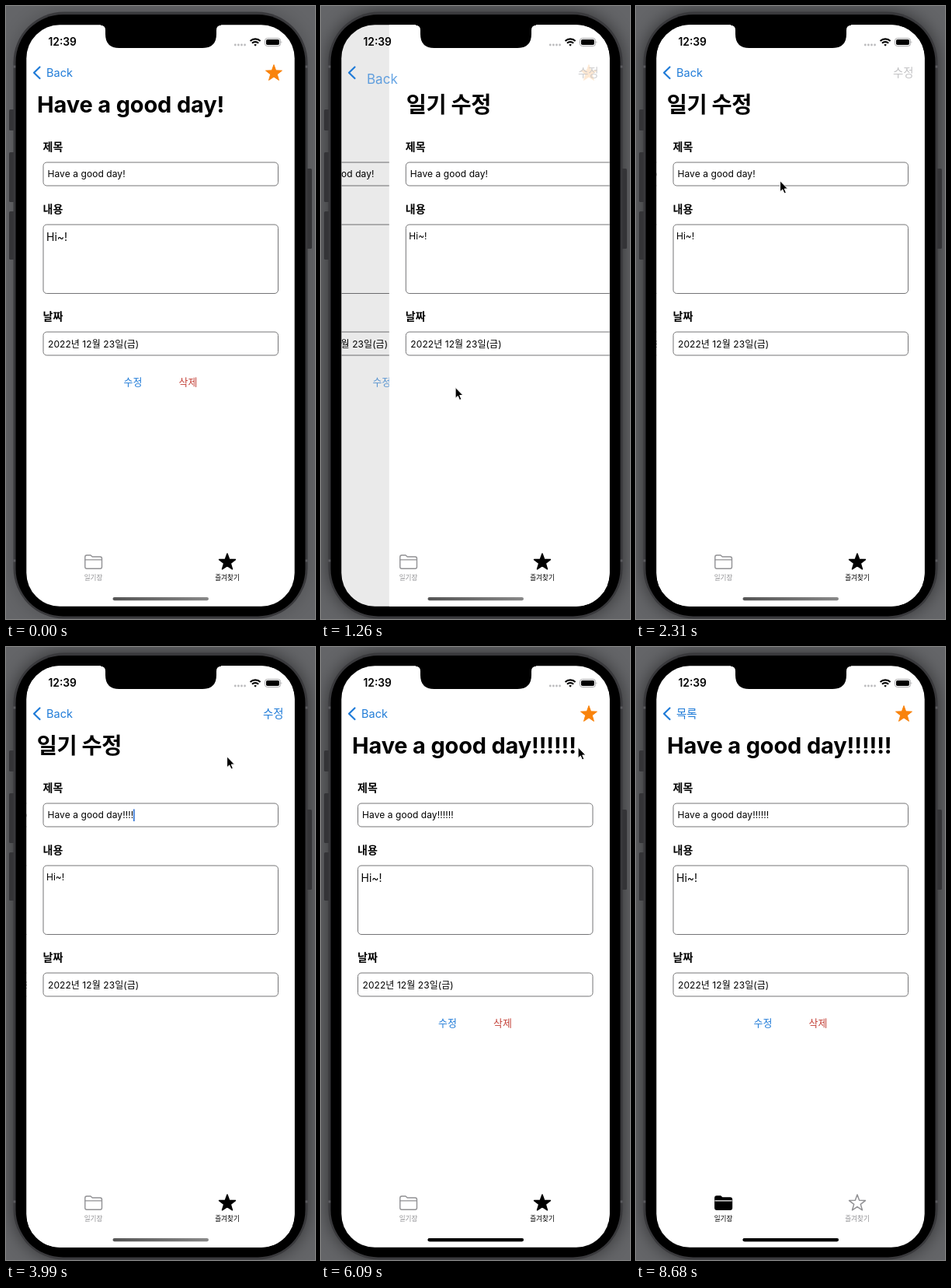
These frames come from a looping animation (398 px wide and 788 px high, 9.24 s). An HTML page:

```html
<!DOCTYPE html>
<html lang="ko">
<head>
<meta charset="utf-8">
<title>Diary</title>
<style>
  html, body { margin: 0; width: 100%; height: 100%; overflow: hidden; background: #56575a; }
  svg { display: block; width: 100%; height: 100%; }
  text { font-family: Inter, "Noto Sans CJK KR", "Noto Sans CJK", "Noto Sans KR", sans-serif; white-space: pre; }
  .title { font-size: 29px; font-weight: 700; letter-spacing: -.15px; }
  #titleB { font-size: 28.4px; letter-spacing: -.4px; }
  .label { font-size: 14px; font-weight: 700; }
  .body { font-size: 12px; letter-spacing: .07px; }
  .nav { font-size: 14.5px; }
  .btn { font-size: 13px; }
  .tab { font-size: 8.6px; font-weight: 500; text-anchor: middle; }
  .box { fill: none; stroke: #747476; stroke-width: 1; }
  .blue { fill: #1f7bd8; }
</style>
</head>
<body>
<svg id="stage" viewBox="0 0 398 788">
  <defs>
    <clipPath id="screen"><rect x="26.300" y="24.300" width="345.400" height="747.400" rx="43"/></clipPath>
    <filter id="soft" x="-20%" y="-20%" width="140%" height="140%"><feGaussianBlur stdDeviation="11"/></filter>
    <linearGradient id="bar"><stop offset="0" stop-color="#555"/><stop offset="1" stop-color="#888"/></linearGradient>
  </defs>

  <!-- device -->
  <rect width="398" height="788" fill="#646568"/>
  <rect id="shade" x="9" y="7" width="380" height="780" rx="66" filter="url(#soft)"/>
  <g fill="#343437">
    <rect x="4" y="133" width="8" height="27" rx="1.5"/>
    <rect x="4" y="188" width="8" height="64" rx="1.5"/>
    <rect x="4" y="264" width="8" height="62" rx="1.5"/>
    <rect x="386" y="209" width="8" height="103" rx="1.5"/>
  </g>
  <rect x="9.5" y="7.5" width="379" height="780" rx="65" fill="#39393c"/>
  <path d="M9.5 78h4M384.5 78h4M9.5 713h4M384.5 713h4" stroke="#5a5a5e" stroke-width="3"/>
  <rect x="12.5" y="11" width="373" height="773.5" rx="61"/>

  <g clip-path="url(#screen)">
    <rect x="26" y="24" width="346" height="748" fill="#fff"/>
    <g id="detail"></g>
    <rect id="dim" x="26" y="24" width="346" height="748"/>
    <g id="edit"><rect x="26.5" y="24" width="346" height="748" fill="#fff"/></g>

    <!-- navigation bar -->
    <path d="M43.5 78.5L36 85.7L43.5 93" fill="none" stroke="#1f7bd8" stroke-width="2.2" stroke-linecap="round" stroke-linejoin="round"/>
    <text id="backA" class="nav blue" x="52" y="91"></text>
    <text id="backB" class="nav blue">Back</text>
    <path id="fav" fill="#f9830c" stroke="#f9830c" stroke-linejoin="round"/>
    <text id="save" class="nav" x="331" y="91.2">수정</text>
    <text id="titleA" class="title"></text>
    <text id="titleB" class="title" x="39.8" y="136.6">일기 수정</text>

    <!-- tab bar -->
    <g id="folder" stroke-linejoin="round">
      <path d="M101.8 708.2q0-2.2 2.2-2.2h5l2.2 2h10q2.3 0 2.3 2.3v10.7q0 2.3-2.3 2.3h-17.2q-2.2 0-2.2-2.3z" stroke-width="1.4"/>
      <path id="fold" d="M101.500 711.8h22.2" stroke-width="1.3"/>
    </g>
    <text id="tabA" class="tab" x="112.5" y="738">일기장</text>
    <path id="star" stroke-width="1.5" stroke-linejoin="round"/>
    <text id="tabB" class="tab" x="285" y="738">즐겨찾기</text>
    <rect x="137.5" y="759.9" width="123.5" height="4.3" rx="2.1" fill="url(#bar)"/>
    <rect id="home" x="137.5" y="759.9" width="123.5" height="4.3" rx="2.1"/>

    <!-- status bar -->
    <text x="54.5" y="51.3" font-size="13.8" font-weight="600">12:39</text>
    <g fill="#bcbcbe">
      <circle cx="295.3" cy="50" r="1.4"/><circle cx="299.4" cy="50" r="1.4"/>
      <circle cx="303.5" cy="50" r="1.4"/><circle cx="307.6" cy="50" r="1.4"/>
    </g>
    <g fill="none" stroke="#000" stroke-width="2.1">
      <path d="M314.6 45a9.300 9.300 0 0 1 13 0M317 47.8a5.900 5.900 0 0 1 8.2 0"/>
      <path d="M321.1 51.8l-1.8-2a2.7 2.7 0 0 1 3.6 0z" fill="#000" stroke="none"/>
    </g>
    <rect x="333.5" y="41.5" width="20" height="10" rx="3" fill="none" stroke="#a4a4a6"/>
    <rect x="335" y="43" width="17" height="7" rx="1.8"/>
    <path d="M354.6 44.8q1.6 1.7 0 3.4z" fill="#a4a4a6"/>
  </g>
  <path d="M122 24H277V24.800Q271 25 271 31V36Q271 54 253 54H146Q128 54 128 36V31Q128 25 122 24.800Z"/>

  <path id="cursor" d="M.6.8V14.8L3.8 11.9L6 17L8.4 16L6.2 11H10.5Z" fill="#000" stroke="#fff" stroke-width="1" stroke-linejoin="round"/>
</svg>

<script>
const LOOP = 9240, STEP = 70;
const PUSH = 1080, POP = 5660, SWITCH = 7210;
const KEYS = [3290, 3500, 3710, 4410, 4690];
const BLUE = '#1f7bd8', GRAY = '#919194';

// pointer waypoints: time, x, y
const TRAIL = [
  [210, 180, 775], [840, 172.5, 489.5], [1260, 172.5, 489.5], [2030, 192, 202],
  [2310, 185, 224], [2940, 185, 224], [3080, 185, 242], [3640, 185, 242],
  [3990, 284, 140], [4270, 300, 128], [4410, 302, 133], [4550, 302, 134],
  [5110, 350, 70], [5460, 341, 90], [5670, 341, 90], [6090, 330.5, 128],
  [6510, 289, 330], [7140, 110, 737], [7280, 114, 730], [8470, 114, 730],
  [8540, 130, 742], [8610, 163, 768]
];

const $ = id => document.getElementById(id);
const set = (el, attrs) => { for (const k in attrs) el.setAttribute(k, attrs[k]); };
const mix = (a, b, p) => a + (b - a) * p;
const clamp = v => Math.max(0, Math.min(1, v));

function add(parent, tag, attrs, text = '') {
  const el = document.createElementNS('http://www.w3.org/2000/svg', tag);
  set(el, attrs);
  el.textContent = text;
  parent.append(el);
  return el;
}

function starPath(cx, cy, r) {
  let d = '';
  for (let i = 0; i < 10; i++) {
    const a = Math.PI * (i / 5 - .5), q = i % 2 ? r * .41 : r;
    d += (i ? 'L' : 'M') + (cx + q * Math.cos(a)).toFixed(2) + ' ' + (cy + q * Math.sin(a)).toFixed(2);
  }
  return d + 'Z';
}

// Both pages share one form; returns its subject line.
function buildForm(page, memoSize, memoY) {
  [['제목', 186.3], ['내용', 266.3], ['날짜', 404.3]].forEach(([s, y]) =>
    add(page, 'text', { class: 'label', x: 47.5, y }, s));
  [[201, 30], [281, 88.5], [419, 30]].forEach(([y, height]) =>
    add(page, 'rect', { class: 'box', x: 48, y, width: 302.5, height, rx: 4.5 }));
  add(page, 'text', { x: 52, y: memoY, 'font-size': memoSize }, 'Hi~!');
  add(page, 'text', { class: 'body', x: 54, y: 438.8 }, '2022년 12월 23일(금)');
  return add(page, 'text', { class: 'body', x: 53.5, y: 220.4 });
}

const subjectA = buildForm($('detail'), 14, 302.3);
const subjectB = buildForm($('edit'), 12, 300);
const modify = add($('detail'), 'text', { class: 'btn blue', x: 151.5, y: 488.4 }, '수정');
add($('detail'), 'text', { class: 'btn', x: 222.5, y: 488.4, fill: '#c4433a' }, '삭제');
const caret = add($('edit'), 'rect', { y: 208.5, width: 1.6, height: 15.5, fill: '#2b6fd2' });
set($('fav'), { d: starPath(345, 86.5, 11) });
set($('star'), { d: starPath(285, 715, 11) });

// critically damped slide, 0 to 1
function slide(ms) {
  if (ms <= 0) return 0;
  if (ms > 620) return 1;
  const x = ms * .0175;
  return 1 - (1 + x) * Math.exp(-x);
}

function drawCursor(t) {
  const shown = t >= 210 && t < 8680;
  set($('cursor'), { visibility: shown ? 'visible' : 'hidden' });
  if (!shown) return;
  let i = 0;
  while (i < TRAIL.length - 2 && t >= TRAIL[i + 1][0]) i++;
  const [t0, x0, y0] = TRAIL[i], [t1, x1, y1] = TRAIL[i + 1];
  const p = clamp((t - t0) / (t1 - t0));
  set($('cursor'), { transform: `translate(${mix(x0, x1, p)} ${mix(y0, y1, p)})` });
}

function caretAlpha(t) {
  if (t < 2450 || (t >= 2940 && t < 3290)) return 0;
  return 1 - .55 * clamp((t - 5390) / 210);
}

function drawTabs(first) {
  const a = first ? '#000' : GRAY, b = first ? GRAY : '#000';
  set($('folder'), { stroke: a, fill: first ? a : 'none' });
  set($('fold'), { stroke: first ? '#fff' : a });
  set($('tabA'), { fill: a });
  set($('star'), { stroke: b, fill: first ? 'none' : b });
  set($('tabB'), { fill: b });
}

function draw(t) {
  const p = slide(t - PUSH) - slide(t - POP), q = 1 - p;
  const typed = KEYS.filter(k => t >= k).length;
  const subject = 'Have a good day!' + '!'.repeat(typed);
  const first = t >= SWITCH;

  set($('shade'), { opacity: t >= 840 ? .5 : .2 });
  set($('detail'), { transform: `translate(${-103.5 * p} 0)` });
  set($('dim'), { opacity: .098 * p });
  set($('edit'), { transform: `translate(${345 * q} 0)`, visibility: p > 0 ? 'visible' : 'hidden' });

  subjectA.textContent = subjectB.textContent = $('titleA').textContent = subject;
  set(caret, { x: 53.3 + subjectB.getComputedTextLength(), opacity: caretAlpha(t) });
  set(modify, { opacity: t >= 980 && t < 1400 ? (t < 1120 ? .4 : .7) : 1 });

  $('backA').textContent = first ? '목록' : 'Back';
  set($('backA'), { opacity: clamp(1 - 2 * p) });
  set($('backB'), {
    opacity: p * p,
    transform: `translate(${mix(91, 52, p)} ${mix(141, 91, p)}) scale(${mix(2, 1, p)})`
  });
  set($('titleA'), {
    opacity: clamp(1 - 1.6 * p),
    transform: `translate(${mix(40, 52, p)} ${mix(137, 91, p)}) scale(${mix(1, .5, p)})`
  });
  set($('titleB'), { transform: `translate(${393 * q} 0)`, opacity: p > 0 ? 1 : 0 });
  set($('fav'), { opacity: q });
  set($('save'), {
    fill: typed ? BLUE : '#c3c3c5',
    opacity: p * (t >= 5600 ? .25 : 1)
  });

  set($('home'), { opacity: clamp((t - POP) / 350) });
  drawTabs(first);
  drawCursor(t);
}

const start = performance.now();
function tick() {
  const t = (performance.now() - start) % LOOP;
  draw(Math.min(8680, Math.floor(t / STEP) * STEP));
  requestAnimationFrame(tick);
}
tick();
</script>
</body>
</html>
```
